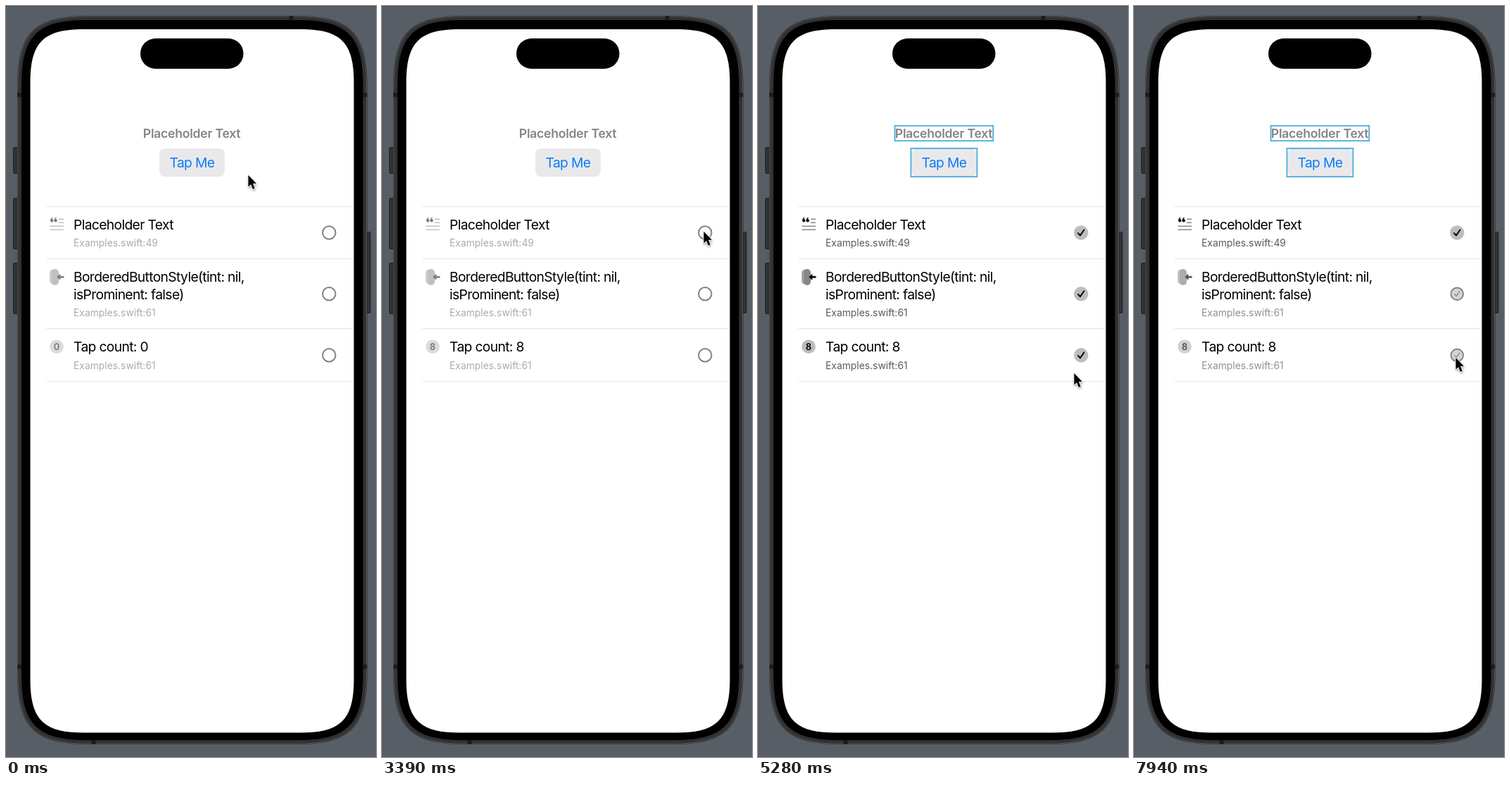
An HTML page that plays this animation: 526 px wide and 1065 px high, repeating every 8000 ms.

```html
<!DOCTYPE html>
<html lang="en">
<head>
<meta charset="utf-8">
<title>Tap count inspector</title>
<style>
  html, body { margin: 0; width: 100%; height: 100%; overflow: hidden; background: #575e66; }
  svg { display: block; width: 526px; height: 1065px; font-family: Inter, "Liberation Sans", sans-serif; }
  .title { font-size: 19.3px; letter-spacing: -0.034em; }
  .sub { font-size: 13.8px; letter-spacing: 0.04px; }
  .head { font-size: 17.6px; font-weight: 600; letter-spacing: -0.014em; fill: #858589; }
  .badge { font-size: 13px; font-weight: 600; text-anchor: middle; }
  .frame { fill: none; stroke: #48ade0; stroke-width: 1.8; }
</style>
</head>
<body>
<svg viewBox="0 0 526 1065" xmlns="http://www.w3.org/2000/svg">
  <defs>
    <filter id="shadow" x="-60%" y="-40%" width="240%" height="200%">
      <feDropShadow dx="0.4" dy="1.6" stdDeviation="1.4" flood-opacity="0.4"/>
    </filter>
    <g id="quote">
      <path id="mark" d="M63 304.3a2.2 2.2 0 1 0 2-2.2q.2-1.1 1.5-1.9l-.5-.7q-3 1.4-3 4.8z"/>
      <use href="#mark" x="5.4"/>
      <path d="M75 302.2h7M75 307.3h7M62.5 312.3H82M62.5 317.2H82" stroke="#8a8a8a" stroke-width="1.5"/>
    </g>
    <g id="press">
      <path d="M68 373.5a5 5 0 0 0-6 5v11a5 5 0 0 0 6 5z" fill="#a2a2a2"/>
      <rect x="65" y="373" width="10" height="23" rx="5" fill="#878787"/>
      <path d="M72.6 384.3l4.4-4v3h5.2v2H77v3z" stroke="#000" stroke-width=".6" stroke-linejoin="round"/>
    </g>
  </defs>

  <rect width="526" height="1065" fill="#575e66"/>
  <rect width="526" height="1" fill="#454b51"/>
  <g fill="#303236" stroke="#1f2022" stroke-width="1">
    <rect x="10.5" y="200.5" width="8" height="37" rx="1.5"/>
    <rect x="10.5" y="272.5" width="8" height="72" rx="1.5"/>
    <rect x="10.5" y="364.5" width="8" height="72" rx="1.5"/>
    <rect x="510" y="320.5" width="8" height="115" rx="1.5"/>
  </g>
  <path id="rim" fill="#1c1d1e"/>
  <path id="band" fill="#303132" stroke="#59595a"/>
  <path d="M16 126h7M506 126h7M16 937h7M506 937h7M405.5 14v7M124.5 1040v7" stroke="#1b1c1d" stroke-width="6"/>
  <path id="bezel"/>
  <path id="screen" fill="#fff"/>
  <rect x="191" y="46" width="146.5" height="43" rx="21.5"/>

  <text class="head" x="194.8" y="187">Placeholder Text</text>
  <g id="button">
    <rect x="218" y="202" width="93" height="40" rx="8" fill="#e9e9eb"/>
    <text id="label" class="title" x="232.5" y="229.3" fill="#0a7bfb">Tap Me</text>
  </g>
  <rect id="textFrame" class="frame" x="194.5" y="169.8" width="139.8" height="21.4"/>
  <rect id="buttonFrame" class="frame" x="217.4" y="201.9" width="94" height="40.2"/>

  <path d="M57.5 284.3H494.5M57.5 358.4H494.5M57.5 457.6H494.5M57.5 532.2H494.5" stroke="#e3e3e5"/>
  <g id="rows"></g>

  <g id="cursor" filter="url(#shadow)">
    <path d="M.4 .8V17.4L4.1 13.9L6.9 20.7L9.8 19.4L7 12.8H12Z"
      stroke="#fff" stroke-width="1.5" stroke-linejoin="round" paint-order="stroke"/>
  </g>
</svg>

<script>
const LOOP = 8000;
const $ = id => document.getElementById(id);
const clamp = x => Math.min(1, Math.max(0, x));

// Rectangle with continuous corners that reach `e` along each edge
function smoothRect(id, x, y, w, h, e) {
  const a = e * 0.757, b = e - a;
  $(id).setAttribute('d', `M${x} ${y + e}c0 ${-a} ${b} ${-e} ${e} ${-e}h${w - 2 * e}
    c${a} 0 ${e} ${b} ${e} ${e}v${h - 2 * e}c0 ${a} ${-b} ${e} ${-e} ${e}h${2 * e - w}
    c${-a} 0 ${-e} ${-b} ${-e} ${-e}z`.replace(`c0 ${-a} ${b} ${-e}`, `c0 ${-a} ${b} ${-e}`));
}
smoothRect('rim', 16, 14, 497.5, 1033, 100);
smoothRect('band', 17, 15, 495.5, 1031, 99);
smoothRect('bezel', 22, 20, 485.5, 1021, 92);
smoothRect('screen', 34.5, 33, 460, 997.5, 76);

// Click times; rows two and three share one source line and toggle together.
const firstClicks = [3440];
const sharedClicks = [4520, 5860, 6805, 7755];
const tapAt = n => 700 + 286 * (n - 1);
const TAPS = 8;

const rows = [
  { y: 321.5, title: [['Placeholder Text', 316.7]], sub: ['Examples.swift:49', 341], clicks: firstClicks,
    icon: '<use href="#quote"/>' },
  { y: 408.2, title: [['BorderedButtonStyle(tint: nil,', 391], ['isProminent: false)', 415.6]],
    sub: ['Examples.swift:61', 440.2], clicks: sharedClicks, icon: '<use href="#press"/>' },
  { y: 495.3, title: [['Tap count: 0', 490.3]], sub: ['Examples.swift:61', 514.7], clicks: sharedClicks,
    icon: '<circle cx="72" cy="483" r="9.8" fill="#bcbcbd"/><text class="badge" x="72" y="487.7">0</text>' }
];

const line = (cls, [text, y]) => `<text class="${cls}" x="96" y="${y}">${text}</text>`;

$('rows').innerHTML = rows.map(r => `<g>
  <g class="icon">${r.icon}</g>
  ${r.title.map(l => line('title', l)).join('')}
  ${line('sub', r.sub)}
  <g transform="translate(459.3 ${r.y})">
    <g class="check">
      <circle class="disc" r="10.2" fill="#bdbdbe"/>
      <path class="tick" d="M-4.2 .6L-1.3 3.9L4.2 -4" fill="none" stroke="#000" stroke-width="2"
        stroke-linecap="round" stroke-linejoin="round"/>
    </g>
    <circle class="ring" r="9.2" fill="none" stroke="#828285" stroke-width="2"/>
  </g>
</g>`).join('');

rows.forEach((row, i) => {
  const g = $('rows').children[i];
  for (const part of ['icon', 'sub', 'ring', 'check', 'disc', 'tick']) row[part] = g.querySelector('.' + part);
});
const countText = $('rows').children[2].querySelector('.title');
const badge = $('rows').querySelector('.badge');

// Cursor stops: time, x, y
const path = [
  [0, 344, 239], [640, 286, 233], [2750, 286, 233], [3330, 457, 319],
  [3800, 457, 319], [4170, 458, 396], [4450, 457, 405], [5000, 457, 408],
  [5280, 449, 520], [5610, 457, 498], [LOOP, 457, 498]
];

function cursorAt(t) {
  const i = path.findIndex(p => p[0] > t);
  const [t0, x0, y0] = path[i - 1], [t1, x1, y1] = path[i];
  const u = (t - t0) / (t1 - t0), e = u * u * (3 - 2 * u);
  return [x0 + (x1 - x0) * e, y0 + (y1 - y0) * e];
}

// Critically damped spring, 0.5 s response
function spring(ms) {
  const x = ms * 0.01257;
  return 1 - (1 + x) * Math.exp(-x);
}

function checkedAt(t, clicks) {
  const past = clicks.filter(c => c <= t);
  if (!past.length) return 0;
  const v = spring(t - past[past.length - 1]);
  return past.length % 2 ? v : 1 - v;
}

// The outline follows its row with a delay and then switches hard.
function framed(t, clicks) {
  return clicks.filter((c, i) => t >= c + (i % 2 ? 420 : 530)).length % 2;
}

function pressedAt(t) {
  let v = 0;
  for (let n = 1; n <= TAPS; n++) {
    const d = t - tapAt(n);
    if (d >= -110) v = d < 0 ? clamp((d + 110) / 40) : clamp(1 - d / 180);
  }
  return v;
}

function draw(t) {
  const [x, y] = cursorAt(t);
  $('cursor').setAttribute('transform', `translate(${x.toFixed(2)} ${y.toFixed(2)})`);

  const count = Math.min(TAPS, Math.max(0, Math.floor((t - tapAt(1)) / 286) + 1));
  countText.textContent = 'Tap count: ' + count;
  badge.textContent = count;
  const press = pressedAt(t);
  $('button').setAttribute('opacity', 1 - 0.15 * press);
  $('label').setAttribute('opacity', 1 - 0.1 * press);

  for (const r of rows) {
    const p = checkedAt(t, r.clicks);
    r.icon.setAttribute('opacity', 0.52 + 0.48 * p);
    r.sub.setAttribute('opacity', 0.33 + 0.32 * p);
    r.ring.setAttribute('opacity', clamp((0.72 - p) / 0.4));
    r.ring.setAttribute('transform', `scale(${1 - 0.15 * p})`);
    r.check.setAttribute('transform', `scale(${0.7 + 0.3 * p})`);
    r.disc.setAttribute('opacity', clamp(2 * p));
    r.tick.setAttribute('opacity', p);
  }
  $('textFrame').setAttribute('opacity', framed(t, firstClicks));
  $('buttonFrame').setAttribute('opacity', framed(t, sharedClicks));
}

const start = performance.now();
function tick() {
  draw((performance.now() - start) % LOOP);
  requestAnimationFrame(tick);
}
tick();
</script>
</body>
</html>
```
